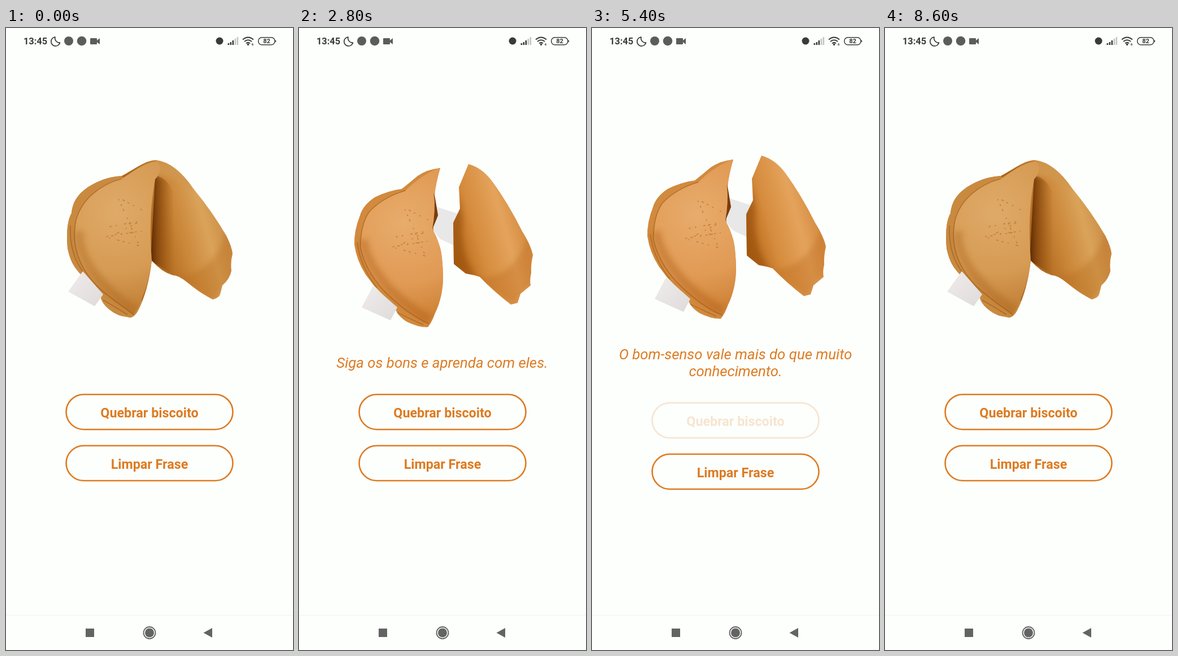
Recreate the animation shown at these times as an HTML page. Size 508 px wide and 1102 px high, loop 8.7 s.

```html
<!DOCTYPE html>
<html lang="pt">
<head>
<meta charset="utf-8">
<title>Biscoito da sorte</title>
<style>
html, body { margin: 0; width: 100%; height: 100%; overflow: hidden; background: #fdfffd; }
svg { display: block; width: 508px; height: 1102px; font-family: Roboto, sans-serif; }
text { text-anchor: middle; }
.btn rect { fill: none; stroke: #dd7b22; stroke-width: 2.6; }
.btn text { fill: #dd7b22; font-size: 23.3px; font-weight: 700; }
.phrase { fill: #dd7b22; font-size: 25.8px; font-style: italic; }
.grey { fill: #5c5c5c; }
.dark { fill: #3a3a3a; }
.line { fill: none; stroke: #3a3a3a; }

/* 8700 ms loop, 100 ms = 1.1494% */
#whole, #broken, #one, #two, #break, #clear, #buttons { animation: 8.7s step-end infinite; }
#whole { animation-name: whole; }
#broken { animation-name: broken; }
#one { animation-name: one; }
#two { animation-name: two; }
#buttons { animation-name: drop; }
#break { animation-name: press-break; }
#clear { animation-name: press-clear; }

@keyframes whole { 0%, 82.75%, 100% { opacity: 1; } 19.54% { opacity: 0; } }
@keyframes broken {
  0%, 82.75%, 100% { opacity: 0; transform: none; }
  19.54% { opacity: 1; transform: none; }
  45.97% { opacity: 1; transform: translateY(-15px); }
}
@keyframes one { 0%, 45.97%, 100% { opacity: 0; } 19.54% { opacity: 1; } }
@keyframes two { 0%, 82.75%, 100% { opacity: 0; } 45.97% { opacity: 1; } }
@keyframes drop { 0%, 82.75%, 100% { transform: none; } 45.97% { transform: translateY(15px); } }
@keyframes press-break {
  0%, 22.98%, 49.42%, 67.81%, 100% { opacity: 1; }
  16.09%, 20.68%, 42.52%, 47.12%, 59.77%, 65.51% { opacity: .5; }
  17.24%, 43.67%, 60.91% { opacity: .2; }
  19.54%, 45.97%, 64.36% { opacity: .25; }
  21.83%, 48.27%, 66.66% { opacity: .94; }
}
@keyframes press-clear {
  0%, 86.2%, 100% { opacity: 1; }
  80.45%, 83.9% { opacity: .5; }
  81.6% { opacity: .2; }
  82.75% { opacity: .26; }
  85.05% { opacity: .94; }
}
</style>
</head>
<body>
<svg viewBox="0 0 508 1102">
  <defs>
    <radialGradient id="lobe" gradientUnits="userSpaceOnUse" cx="195" cy="325" r="195">
      <stop offset="0" stop-color="#dfaa68"/><stop offset=".55" stop-color="#d69b54"/><stop offset="1" stop-color="#bb782d"/>
    </radialGradient>
    <radialGradient id="lobe2" gradientUnits="userSpaceOnUse" cx="185" cy="345" r="200">
      <stop offset="0" stop-color="#e8ac6c"/><stop offset=".55" stop-color="#e09a54"/><stop offset="1" stop-color="#c67628"/>
    </radialGradient>
    <linearGradient id="side" gradientUnits="userSpaceOnUse" x1="258" y1="370" x2="402" y2="330">
      <stop offset="0" stop-color="#ad671c"/><stop offset=".35" stop-color="#cb873a"/><stop offset=".65" stop-color="#daa35a"/><stop offset="1" stop-color="#c4823a"/>
    </linearGradient>
    <linearGradient id="side2" gradientUnits="userSpaceOnUse" x1="272" y1="385" x2="415" y2="345">
      <stop offset="0" stop-color="#b46516"/><stop offset=".3" stop-color="#d58b3c"/><stop offset=".65" stop-color="#e4a35c"/><stop offset="1" stop-color="#ce8234"/>
    </linearGradient>
    <linearGradient id="fold" gradientUnits="userSpaceOnUse" x1="256" y1="0" x2="298" y2="0">
      <stop offset="0" stop-color="#5e2a04"/><stop offset=".3" stop-color="#8a4b10"/><stop offset="1" stop-color="#a65f17" stop-opacity="0"/>
    </linearGradient>
    <linearGradient id="slip" x1="0" y1="0" x2="1" y2="1">
      <stop offset="0" stop-color="#efeceb"/><stop offset="1" stop-color="#dedbda"/>
    </linearGradient>
    <filter id="soft" x="-20%" y="-20%" width="140%" height="140%"><feGaussianBlur stdDeviation="5"/></filter>
    <path id="wholeEdge" d="M265 234C245 235 228 250 205 262C180 264 165 270 145 282C125 296 118 310 116 328C108 342 107 365 109 390C114 415 122 425 132 436L168 478C171 492 190 506 204 510L220 513Q228 512 234 500Q252 465 258 412Q275 432 295 438Q305 438 320 450Q342 468 357 476L366 481Q377 478 379 472L383 456Q396 445 399 430Q397 415 401 400Q400 388 390 368Q365 325 332 285Q300 238 265 234Z"/>
    <path id="leftEdge" d="M250 248Q228 250 210 262Q196 274 182 285Q158 288 134 300Q113 314 108 332Q97 360 98 384Q102 412 118 437L133 457L170 495Q172 508 190 520Q212 531 228 530Q235 522 241 505Q255 475 255 440Q254 405 250 390Q244 370 238 360V352L246 332L240 296Q242 275 250 248Z"/>
    <path id="rightEdge" d="M300 241L283 282L285 320L273 345L274 418L295 435Q308 437 320 441Q345 467 375 490L387 487L392 471L410 456Q408 446 411 434Q410 420 414 402Q410 384 395 360Q370 310 343 273Q325 248 300 241Z"/>
    <clipPath id="inWhole"><use href="#wholeEdge"/></clipPath>
    <clipPath id="inLeft"><use href="#leftEdge"/></clipPath>
    <clipPath id="inRight"><use href="#rightEdge"/></clipPath>
    <path id="pits" fill="none" stroke="#a9611b" stroke-width="1.8" stroke-linecap="round" opacity=".5"
      stroke-dasharray="2 9 1 14 3 7" d="M184 352L238 342L192 366L240 360L176 370L236 386L198 300L240 322"/>
  </defs>

  <!-- status bar -->
  <text class="dark" x="52" y="29" font-size="16.4" font-weight="600">13:45</text>
  <path class="line" stroke-width="1.7" stroke-linejoin="round" d="M87 16A8 8 0 1 0 95.500 26A8 8 0 0 1 87 16Z"/>
  <circle class="grey" cx="111" cy="23" r="8"/>
  <circle class="grey" cx="134" cy="23" r="8.300"/>
  <path class="grey" d="M150 18H160Q161 18 161 19V22L166 18V29L161 25V28Q161 29 160 29H150Q149 29 149 28V19Q149 18 150 18Z"/>
  <circle class="dark" cx="378" cy="23" r="6.500"/>
  <path class="dark" d="M392.500 27h2.600v3h-2.600zM396.500 25h2.600v5h-2.600zM400.500 22h2.600v8h-2.600z"/>
  <path fill="#c4c4c4" d="M404.500 19h2.600v11h-2.600zM408.500 16h2.600v14h-2.600z"/>
  <path class="line" stroke-width="2" d="M419 20.500Q428.500 12.500 438 20.500M422 24Q428.500 18.500 435 24M425 27.300Q428.500 24.500 432 27.300"/>
  <circle class="dark" cx="428.500" cy="29.300" r="1.800"/>
  <text class="dark" x="436.500" y="31" font-size="6" font-weight="700">6</text>
  <rect class="line" x="446.700" y="16.700" width="29" height="13" rx="6" stroke-width="1.500"/>
  <path class="dark" d="M476.500 21q1.600 0 1.600 2.200t-1.600 2.200z"/>
  <text class="dark" x="461.500" y="27.200" font-size="11" font-weight="700">82</text>

  <g id="whole">
    <use href="#wholeEdge" fill="url(#side)"/>
    <g clip-path="url(#inWhole)">
      <path d="M395 345L405 440L366 484L300 440Q370 440 395 345Z" fill="#b56a1c" opacity=".35" filter="url(#soft)"/>
      <path d="M264 262Q282 262 296 290L300 440L256 412Z" fill="url(#fold)"/>
      <path d="M264 234Q310 232 335 290Q300 262 268 262Z" fill="#d0964d" filter="url(#soft)"/>
      <path d="M205 258L100 290V440L170 520H240V440Z" fill="#c98a40"/>
      <path d="M268 236C240 240 225 255 205 267C165 278 134 304 124 340C115 385 130 425 162 458C190 484 215 498 226 508Q252 465 258 412Q252 330 264 268Q280 250 268 236Z" fill="url(#lobe)"/>
      <path d="M130 360C125 400 160 455 228 500" fill="none" stroke="#a96019" stroke-width="16" opacity=".35" filter="url(#soft)"/>
      <path d="M205 267C165 278 134 304 124 340C115 385 130 425 162 458C190 484 215 498 226 508M114 350C112 395 126 422 148 447M172 482Q190 492 215 508" fill="none" stroke="#96561b" stroke-width="1.800" opacity=".55"/>
    </g>
    <use href="#pits"/>
    <path d="M136 431L172 472L157 493L110 467Z" fill="url(#slip)"/>
  </g>

  <g id="broken">
    <path d="M244 317L285 330L273 350L276 386L250 374L236 357Z" fill="#e8e8e8"/>
    <use href="#rightEdge" fill="url(#side2)"/>
    <g clip-path="url(#inRight)">
      <path d="M283 300L268 345V425L318 448Q282 400 290 340Z" fill="#96500e" opacity=".6" filter="url(#soft)"/>
      <path d="M408 360L418 445L380 492L310 444Q385 445 408 360Z" fill="#b9681a" opacity=".35" filter="url(#soft)"/>
    </g>
    <use href="#leftEdge" fill="#d18a3e"/>
    <g clip-path="url(#inLeft)">
      <path d="M255 245Q215 260 188 289Q148 300 124 326Q108 350 109 390Q118 430 150 465Q190 506 230 524L260 470V400L236 356L246 332L238 296Z" fill="url(#lobe2)"/>
      <path d="M114 375C118 420 165 480 230 515" fill="none" stroke="#b05f14" stroke-width="16" opacity=".4" filter="url(#soft)"/>
      <path d="M188 288Q148 300 124 326Q108 350 109 390Q118 430 150 465Q190 506 230 524M103 380Q108 422 138 460M174 504Q190 512 220 526" fill="none" stroke="#9e5818" stroke-width="1.800" opacity=".55"/>
      <path d="M239 292L248 330L236 356Q242 325 239 292Z" fill="#7c3c0c"/>
    </g>
    <use href="#pits" transform="translate(-12 18)"/>
    <path d="M131 457L174 495L162 518L111 495Z" fill="url(#slip)"/>
  </g>

  <text id="one" class="phrase" x="253.500" y="602">Siga os bons e aprenda com eles.</text>
  <text id="two" class="phrase"><tspan x="254" y="587">O bom-senso vale mais do que muito</tspan><tspan x="254" y="617">conhecimento.</tspan></text>

  <g id="buttons">
    <g id="break" class="btn">
      <rect x="106.500" y="649.200" width="295" height="62" rx="31"/>
      <text x="254" y="689.500">Quebrar biscoito</text>
    </g>
    <g id="clear" class="btn">
      <rect x="106.500" y="740" width="295" height="62" rx="31"/>
      <text x="254" y="780.500">Limpar Frase</text>
    </g>
  </g>

  <!-- navigation bar -->
  <path d="M0 1040.500H508" stroke="#f1f3f1"/>
  <g fill="#636363">
    <path d="M141 1064h15v15h-15zM349.500 1071.500L365 1063v17z"/>
    <circle cx="254" cy="1071.500" r="8"/>
    <circle cx="254" cy="1071.500" r="10.500" style="fill:none;stroke:#636363;stroke-width:1.800"/>
  </g>
</svg>
</body>
</html>
```
